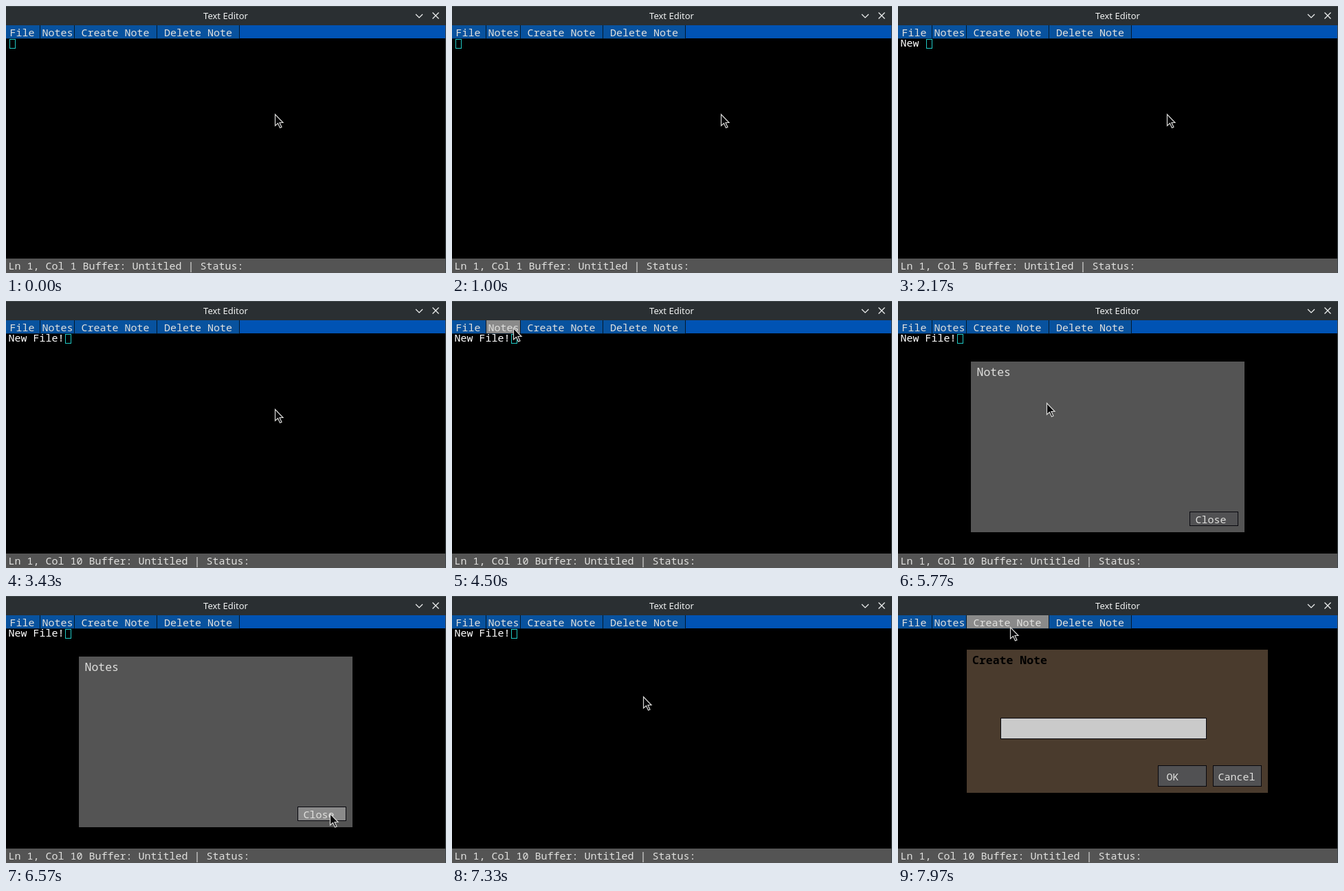
Write an HTML page that moves like this. It is 640 px wide and 388 px high and loops after 8000 ms.

```html
<!DOCTYPE html>
<html lang="en">
<head>
<meta charset="utf-8">
<title>Text Editor</title>
<style>
  html, body { margin: 0; width: 100%; height: 100%; overflow: hidden; background: #000; }
  svg { display: block; width: 100vw; height: 100vh; }
  text { font: 300 15px "Noto Sans Mono", monospace; fill: #e0e0de; white-space: pre; }
  #typed { fill: #fff; }
  .caption { font: 13px "Noto Sans", sans-serif; fill: #f0f2f2; text-anchor: middle; }
  .heading { font-size: 16.5px; }
  .bold { font-weight: 700; fill: #000; }
  .line { fill: none; stroke: #f0f2f2; stroke-width: 1.2; }
  .framed { stroke: #08080e; }
  .menu rect { fill: #08529e; }
  .menu path { fill: none; stroke: #04182a; }
  .menu.hover rect, .button.hover rect { fill: #8a8a8a; }
  .button rect { fill: #515153; }
</style>
</head>
<body>
<svg viewBox="0 0 640 388" preserveAspectRatio="none">
  <rect width="640" height="388"/>
  <rect width="640" height="28" fill="#2a2f32"/>
  <rect width="640" height="1" fill="#42494c"/>
  <text class="caption" x="319.5" y="19">Text Editor</text>
  <path class="line" d="M596 12l5 5 5-5M620.5 9.500l9 9m0-9l-9 9"/>

  <rect y="28" width="640" height="19" fill="#0053b4"/>
  <g id="menus"></g>

  <g id="editor">
    <text id="typed" x="3.5" y="59"></text>
    <rect id="caret" y="48.5" width="8" height="13" fill="none" stroke="#20c8c4"/>
  </g>

  <rect y="367" width="640" height="21" fill="#545454"/>
  <text id="status" x="3.500" y="383"></text>
  <rect x="639" y="28" width="1" height="360" fill="#42494c"/>

  <g id="notesDialog">
    <rect x="106" y="88" width="398" height="248" fill="#545454"/>
    <text class="heading" x="114.5" y="109">Notes</text>
    <g class="button" id="close">
      <rect class="framed" x="424.5" y="306.5" width="70" height="20"/>
      <text x="432.5" y="323">Close</text>
    </g>
  </g>

  <g id="createDialog">
    <rect x="100" y="78" width="438" height="208" fill="#4a3b2d"/>
    <text class="heading bold" x="108" y="99">Create Note</text>
    <rect class="framed" x="149.5" y="177.5" width="299" height="30" fill="#cacaca"/>
    <g class="button">
      <rect class="framed" x="378.5" y="246.5" width="70" height="30"/>
      <text x="390.5" y="268">OK</text>
    </g>
    <g class="button">
      <rect class="framed" x="458.5" y="246.5" width="70" height="30"/>
      <text x="465.5" y="268">Cancel</text>
    </g>
  </g>

  <path id="pointer" d="M-.5 -.5V16l4-3.500 3 6.500 2.500-1-3-6.500h5z" fill="#060608" stroke="#d8d8d6" stroke-width="1.2"/>
</svg>
<script>
const LOOP = 8000;
const MESSAGE = "New File!";
const KEY_TIMES = [1740, 1860, 2000, 2120, 2400, 2520, 2640, 2780, 3100];
const NOTES_OPEN = 4700, NOTES_CLOSE = 6850, CREATE_OPEN = 7740;

const ease = {
  in: u => u * u,
  out: u => u * (2 - u),
  both: u => u * u * (3 - 2 * u)
};

// Pointer stops; each easing shapes the way to that stop.
const stops = [
  { t: 3480, x: 392, y: 158 },
  { t: 4350, x: 90, y: 40, move: ease.both },
  { t: 5300, x: 90, y: 40, move: ease.both },
  { t: 5770, x: 216, y: 148, move: ease.in },
  { t: 6420, x: 472, y: 317, move: ease.out },
  { t: 6950, x: 472, y: 317, move: ease.both },
  { t: 7600, x: 164, y: 46, move: ease.both }
];

const $ = id => document.getElementById(id);

const menus = [
  { label: "File", x: 0, end: 49, textX: 5.5 },
  { label: "Notes", x: 50, end: 99, textX: 52.5 },
  { label: "Create Note", x: 100, end: 219, textX: 109.5 },
  { label: "Delete Note", x: 220, end: 339, textX: 230 }
];
$("menus").innerHTML = menus.map(m => `<g class="menu">
  <rect x="${m.x}" y="28" width="${m.end - m.x}" height="19"/>
  <path d="M${m.end + 0.5} 28V47.5H${m.x}"/>
  <text x="${m.textX}" y="44">${m.label}</text></g>`).join("");
const menuNodes = [...$("menus").children];

function pointerAt(t) {
  const next = stops.findIndex(s => s.t > t);
  if (next === 0) return stops[0];
  if (next < 0) return stops[stops.length - 1];
  const a = stops[next - 1], b = stops[next];
  const u = b.move((t - a.t) / (b.t - a.t));
  return { x: a.x + (b.x - a.x) * u, y: a.y + (b.y - a.y) * u };
}

const inside = (p, left, top, right, bottom) =>
  p.x >= left && p.x < right && p.y >= top && p.y < bottom;

function show(id, visible) {
  $(id).style.display = visible ? "" : "none";
}

function draw(t) {
  const count = KEY_TIMES.filter(k => k <= t).length;
  $("typed").textContent = MESSAGE.slice(0, count);
  $("caret").setAttribute("x", 5.5 + 9 * count);
  $("status").textContent = `Ln 1, Col ${count + 1} Buffer: Untitled | Status:`;

  show("notesDialog", t >= NOTES_OPEN && t < NOTES_CLOSE);
  show("createDialog", t >= CREATE_OPEN);
  show("editor", t < CREATE_OPEN);

  const p = pointerAt(t);
  $("pointer").setAttribute("transform", `translate(${Math.round(p.x)} ${Math.round(p.y)})`);
  menus.forEach((m, i) =>
    menuNodes[i].classList.toggle("hover", inside(p, m.x, 28, m.end, 48)));
  $("close").classList.toggle("hover", inside(p, 424, 306, 495, 327));
}

const start = performance.now();
function tick() {
  draw((performance.now() - start) % LOOP);
  requestAnimationFrame(tick);
}
tick();
</script>
</body>
</html>
```
